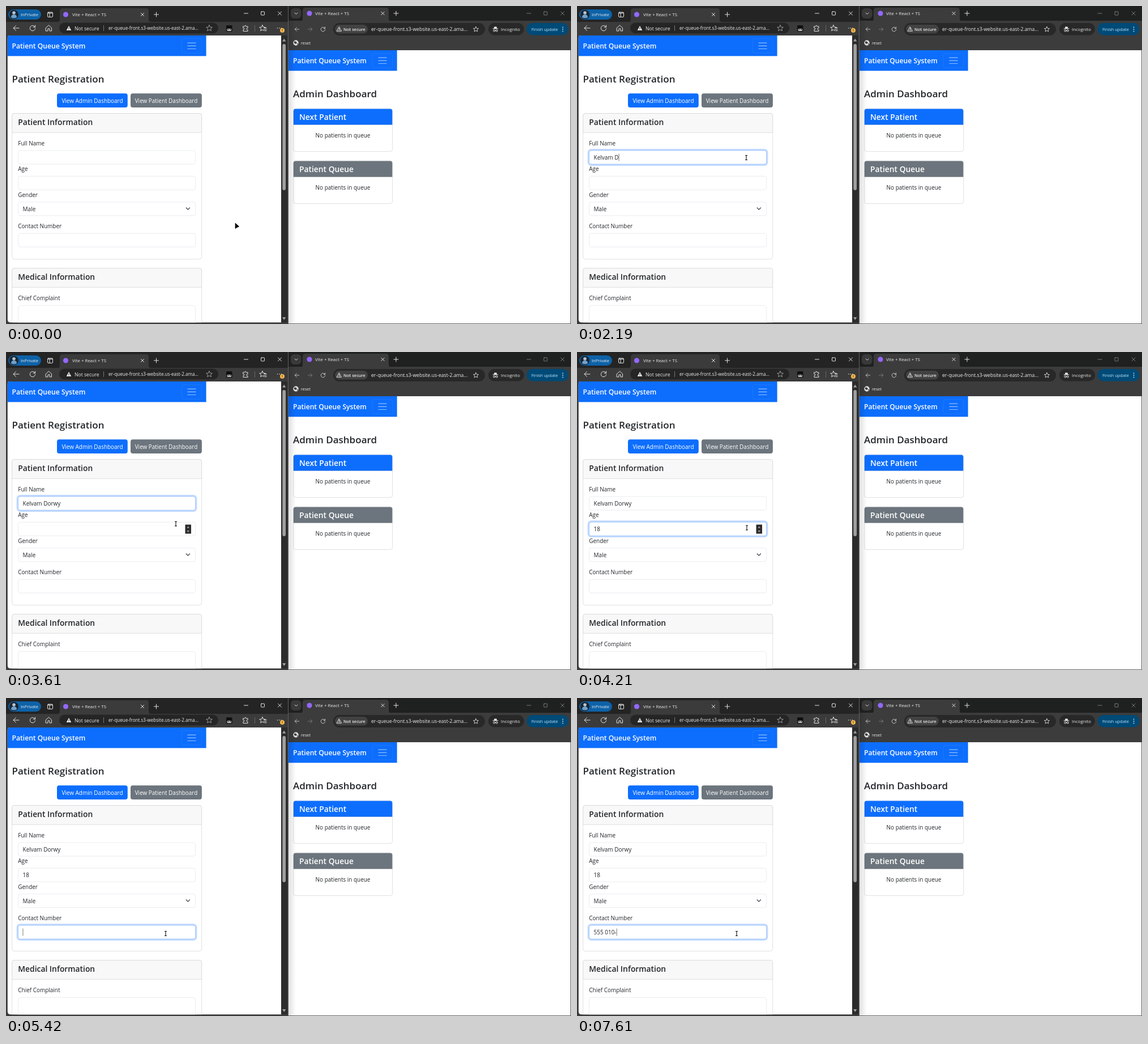
Animation, 998 px wide and 561 px high, one loop 8000 ms. Source, as an HTML page:

```html
<!DOCTYPE html>
<html lang="en">
<head>
<meta charset="utf-8">
<title>Patient queue demo</title>
<style>
html, body { margin: 0; width: 100%; height: 100%; overflow: hidden; background: #fff; }
body { position: relative; font-family: "Open Sans", "Noto Sans", sans-serif; }
svg { position: absolute; left: 0; top: 0; }
text { font-size: 9.95px; fill: #212529; }
.h1 { font-size: 17.05px; font-weight: 600; }
.h2 { font-size: 13.85px; font-weight: 600; }
.brand { font-size: 12.15px; font-weight: 600; }
.white { fill: #fff; }
.mid { text-anchor: middle; }
.ui { fill: #ececec; font-size: 7.9px; }
.line { fill: none; stroke: #e2e2e2; stroke-width: 1; stroke-linecap: round; stroke-linejoin: round; }
.card { fill: #fff; stroke: #d2d3d5; stroke-width: .7; }
.head { fill: #f8f8f8; stroke: #d2d3d5; stroke-width: .7; }
/* Form controls keep their natural CSS sizes and are zoomed like the page. */
.field {
  position: absolute; left: 0; top: 0; width: 484px; height: 38px; box-sizing: border-box;
  transform: translate(21.2px, var(--y)) scale(.648); transform-origin: 0 0;
  border: 1px solid #dee2e6; border-radius: 6px; background: #fff; color: #212529;
  padding-left: 12px; font-size: 15.35px; line-height: 37px; white-space: pre;
}
.field.focus { border-color: #86b7fe; box-shadow: 0 0 0 4px rgba(13, 110, 253, .25); }
.field span { border-right: 1.5px solid transparent; }
.field.caret span { border-color: #333; }
</style>
</head>
<body>
<svg width="998" height="561" viewBox="0 0 998 561">
  <defs>
    <path id="star" class="line" d="M0-5.3 1.6-1.8 5.3-1.5 2.5 1 3.4 4.8 0 2.8-3.4 4.8-2.5 1-5.3-1.5-1.6-1.8Z"/>
    <path id="reload" class="line" d="M4.3-1.8A4.7 4.7 0 1 0 4.7.7M4.6-5V-1.7H1.3"/>
    <path id="back" class="line" d="M5 0H-5M-.6-4.4-5 0-.6 4.4"/>
    <path id="close" class="line" d="M-2.7-2.7 2.7 2.7M2.7-2.7-2.7 2.7"/>
    <path id="plus" class="line" d="M-4 0H4M0-4V4"/>
    <g id="bars" fill="none" stroke="#fff">
      <rect x="-17.8" y="-12.8" width="35.6" height="25.6" rx="4" stroke-opacity=".1" stroke-width=".65"/>
      <path d="M-7.1-5.2H7.1M-7.1 0H7.1M-7.1 5.2H7.1" stroke-opacity=".55" stroke-width="1.2" stroke-linecap="round"/>
    </g>
    <g id="windowButtons" class="line">
      <path d="M-33 0h7"/><rect x="-3" y="-3" width="6" height="6" rx=".8"/>
      <path d="m27-3 6 6m0-6-6 6"/>
    </g>
    <g id="queueCard">
      <rect x=".3" y=".3" width="175.2" height="75.4" rx="4" class="card"/>
      <path d="M.65 28.6V4.4q0-3.800 3.800-3.800h166.900q3.800 0 3.800 3.800v24.200Z"/>
      <path d="M.65 28.200h174.500" stroke="#000" stroke-opacity=".175" stroke-width=".65"/>
    </g>
    <clipPath id="page"><path d="M7 52H486V558.300H8Q2.800 558.300 2.800 553V56Q2.800 52 7 52Z"/></clipPath>
    <linearGradient id="shade">
      <stop stop-color="#000" stop-opacity=".12"/><stop offset="1" stop-color="#000" stop-opacity="0"/>
    </linearGradient>
  </defs>

  <!-- left browser -->
  <rect width="498" height="561" fill="#3b3b3b"/>
  <rect width="498" height="28" fill="#242424"/>
  <path d="M91 28q4 0 4-4V9q0-5 5-5H248q4 0 4 5v15q0 4 4 4Z" fill="#3b3b3b"/>
  <rect x="4" y="6" width="58" height="18" rx="9" fill="#0d62a8"/>
  <circle cx="14" cy="15" r="8" fill="#1c2530"/>
  <circle cx="14" cy="12" r="2.8" fill="#b6c5d4"/>
  <path d="M9 20q0-5 5-5t5 5q-5 3-10 0Z" fill="#6fa1cc"/>
  <text x="26" y="18" class="ui white" style="font-size:7.5px">InPrivate</text>
  <rect x="73.5" y="11" width="9" height="8.5" rx="1.5" class="line"/>
  <path d="M73.5 12.5h9M77 12.5v7" class="line"/>
  <circle cx="105.5" cy="15" r="4.6" fill="#9468fe"/>
  <text x="117" y="18" class="ui">Vite + React + TS</text>
  <use href="#close" x="241" y="15"/>
  <use href="#plus" x="265.5" y="15"/>
  <use href="#windowButtons" x="453.5" y="13"/>
  <use href="#back" x="18" y="39"/>
  <use href="#reload" x="47" y="39"/>
  <path d="M70.5 38.5 75.5 34l5 4.500V44h-3.500v-4h-3v4h-3.500Z" class="line"/>
  <rect x="94" y="29.5" width="281" height="19" rx="9.5" fill="#252525"/>
  <path d="m111 35 4.300 8h-8.600Z" fill="#eee"/>
  <path d="M111 38v2.500m0 1v.8" stroke="#252525"/>
  <text x="121" y="42.500" class="ui" style="font-size:8.65px">Not secure</text>
  <path d="M172.500 34v10" stroke="#777"/>
  <text x="181" y="42.300" class="ui" style="font-size:8.05px">er-queue-front.s3-website.us-east-2.ama...</text>
  <use href="#star" x="359" y="39" opacity=".6"/>
  <rect x="389" y="34" width="10.5" height="11" rx="1.5" fill="#111"/>
  <rect x="390.5" y="40" width="7.5" height="4" rx="1.5" fill="#ddd"/>
  <circle cx="392.6" cy="41.500" r="1.100" fill="#111"/><circle cx="396" cy="41.500" r="1.100" fill="#111"/>
  <path d="M419 36h2.500q.5-2.500 2-1.500l.5 1.500h3v3q-2.500 0-2.500 1.500t2.500 1.500v2.500h-8v-3q2 0 2-1.500t-2-1.500Z" class="line"/>
  <path d="M439.500 34v11" stroke="#666"/>
  <use href="#star" x="453" y="39"/>
  <path d="M455 38h6v6h-5Z" fill="#3b3b3b"/><path d="M456 38.500h4M456 41h4M457 43.500h3" class="line"/>
  <path d="M479.500 39h.1m3.400 0h.1m3.400 0h.1" class="line" style="stroke-width:1.5"/>
  <circle cx="488" cy="43" r="4" fill="#f5b64c"/><path d="M488 41v2.500m0 .8v.8" stroke="#48320c"/>

  <g clip-path="url(#page)">
    <rect x="2" y="52" width="484" height="507" fill="#fff"/>
    <rect x="2" y="52" width="351.6" height="36.300" fill="#0d6efd"/>
    <text x="10.5" y="75" class="brand white">Patient Queue System</text>
    <use href="#bars" x="328" y="70.300"/>
    <text x="10.5" y="135" class="h1">Patient Registration</text>
    <rect x="90" y="154.300" width="124.800" height="24.600" rx="3.900" fill="#0d6efd"/>
    <rect x="220" y="154.300" width="125.900" height="24.600" rx="3.900" fill="#6c757d"/>
    <text x="152.500" y="171" class="mid white">View Admin Dashboard</text>
    <text x="283" y="171" class="mid white">View Patient Dashboard</text>

    <rect x="10.600" y="189.500" width="335" height="257" rx="4" class="card"/>
    <path d="M10.600 223.300v-29.800q0-4 4-4h327q4 0 4 4v29.800Z" class="head"/>
    <text x="21.300" y="210" class="h2">Patient Information</text>
    <text x="21.300" y="246">Full Name</text>
    <text x="21.300" y="291.300">Age</text>
    <text x="21.300" y="336.500">Gender</text>
    <text x="21.300" y="392">Contact Number</text>

    <rect x="10.600" y="462.500" width="335" height="120" rx="4" class="card"/>
    <path d="M10.600 496.300v-29.800q0-4 4-4h327q4 0 4 4v29.800Z" class="head"/>
    <text x="21.300" y="483" class="h2">Medical Information</text>
    <text x="21.300" y="519">Chief Complaint</text>
    <rect x="21.500" y="528.300" width="313" height="50" rx="4" fill="#fff" stroke="#dee2e6" stroke-width=".65"/>
  </g>
  <rect x="486" y="52" width="11" height="506" fill="#2c2c2c"/>
  <path d="m488 62.500 3.200-5 3.200 5ZM488 549l3.200 5 3.200-5Z" fill="#9f9f9f"/>
  <rect x="488.300" y="67" width="5.800" height="258" rx="2.900" fill="#9f9f9f"/>

  <!-- right browser -->
  <rect x="498" width="500" height="561" fill="#606060"/>
  <rect x="499" width="499" height="27" fill="#1f2020"/>
  <rect x="499" y="26" width="499" height="52" fill="#3c3c3c"/>
  <rect x="499" y="78" width="498" height="482" fill="#fff"/>
  <rect x="503" y="4" width="18.500" height="18" rx="6" fill="#393939"/>
  <path d="m510 12 2.500 2.500L515 12" class="line"/>
  <path d="M520 26.500q4 0 4-4V8q0-5 5-5H671q5 0 5 5v14.500q0 4 4 4Z" fill="#3c3c3c"/>
  <circle cx="536" cy="13" r="4.600" fill="#9468fe"/>
  <text x="546" y="16" class="ui">Vite + React + TS</text>
  <use href="#close" x="665.500" y="13"/>
  <use href="#plus" x="689" y="13"/>
  <use href="#windowButtons" x="953" y="13" opacity=".45"/>
  <use href="#back" transform="translate(514 41)scale(.75)"/>
  <use href="#back" transform="translate(537 41)scale(-.75 .75)" opacity=".45"/>
  <use href="#reload" transform="translate(560 41)scale(.8)"/>
  <rect x="578" y="30" width="268" height="22" rx="11" fill="#282828"/>
  <rect x="581" y="33" width="58" height="15.500" rx="7.700" fill="#424242"/>
  <path d="m588.500 37 4 7.300h-8ZM588.500 39.500v2.200m0 .8v.5" class="line"/>
  <text x="596" y="43.700" class="ui" style="font-size:7.45px;font-weight:600">Not secure</text>
  <text x="645" y="44" class="ui" style="font-size:8.65px">er-queue-front.s3-website.us-east-2.ama...</text>
  <use href="#star" transform="translate(830 41)scale(.85)"/>
  <rect x="852" y="30" width="63" height="21.500" rx="10.700" fill="#282828"/>
  <path d="m861.500 40 1-3.500h4l1 3.500Z" fill="#e8e8e8"/>
  <path d="M860 40h9M864 43.500h1" class="line"/>
  <circle cx="862.300" cy="43.500" r="1.600" class="line"/><circle cx="866.700" cy="43.500" r="1.600" class="line"/>
  <text x="874" y="43.700" class="ui" style="font-size:7.8px">Incognito</text>
  <rect x="919.500" y="30" width="74" height="21.500" rx="10.700" fill="#004a77"/>
  <text x="928" y="43.500" class="ui" style="font-size:7.45px;fill:#c2e7ff">Finish update</text>
  <path d="M983.500 37.500v.1m0 3.400v.1m0 3.400v.1" class="line" style="stroke:#c2e7ff;stroke-width:1.8"/>
  <circle cx="512" cy="65" r="4.700" fill="#e3e3e3"/>
  <path d="M509 62.500h3l2 2-2 2.500-3-1.500Zm5 3 2 1-2 2Z" fill="#3c3c3c"/>
  <text x="521" y="67.800" class="ui" style="font-size:7.25px">reset</text>

  <rect x="499" y="78" width="191.700" height="36.300" fill="#0d6efd"/>
  <text x="507" y="101" class="brand white">Patient Queue System</text>
  <use href="#bars" x="665" y="96.300"/>
  <text x="507" y="161" class="h1">Admin Dashboard</text>
  <use href="#queueCard" x="507.200" y="180.900" fill="#0d6efd"/>
  <text x="518" y="201" class="h2 white">Next Patient</text>
  <text x="595" y="232" class="mid">No patients in queue</text>
  <use href="#queueCard" x="507.200" y="272.900" fill="#6c757d"/>
  <text x="518" y="293" class="h2 white">Patient Queue</text>
  <text x="595" y="324" class="mid">No patients in queue</text>
  <rect x="499" y="26" width="13" height="534" fill="url(#shade)"/>
</svg>

<div class="field" id="name" style="--y:254.7px"><span></span></div>
<div class="field" id="age" style="--y:299.9px"><span></span></div>
<div class="field" style="--y:345.5px"><span>Male</span></div>
<div class="field" id="phone" style="--y:400.8px"><span></span></div>

<svg width="998" height="561" viewBox="0 0 998 561">
  <path d="m318.200 356 3.100 3.100 3.100-3.100" fill="none" stroke="#343a40" stroke-width="1.200" stroke-linecap="round" stroke-linejoin="round"/>
  <g id="spinner">
    <rect x="316.500" y="304.500" width="10.500" height="16" fill="#2c2c2c"/>
    <path d="m319.500 310.500 2.200-3 2.200 3ZM319.500 315l2.200 3 2.200-3Z" fill="#aaa"/>
  </g>
  <g id="pointer">
    <circle id="click" r="7.700" fill="#fdf767"/>
    <path id="beam" d="M-2-4h1.300l.7.700.7-.7H2M0-3.500v7M-2 4h1.300L0 3.300l.7.700H2" fill="none" stroke="#111" stroke-width="1.100"/>
    <path id="arrow" d="M0 0V9.800L2.300 8 6.700 6.100Z" fill="#000" stroke="#000" stroke-width=".6" stroke-linejoin="round"/>
  </g>
</svg>

<script>
const LOOP = 8000;
const $ = id => document.getElementById(id);
const fields = ["name", "age", "phone"];
const full = { name: "Kelvam Dorwy", age: "18", phone: "555 010-" };

// Each step lists only what changes at that time.
const steps = [
  { at: 0, x: 405, y: 383, shape: "arrow", focus: "", caret: "", click: false, spinner: false, name: 0, age: 0, phone: 0 },
  { at: 200, x: 362, y: 334 },
  { at: 390, x: 299, y: 267.5, shape: "beam" },
  { at: 580, click: true, caret: "name" },
  { at: 770, click: false, focus: "name" },
  { at: 1170, name: 1 },
  { at: 1380, name: 2 },
  { at: 1580, name: 4 },
  { at: 1780, name: 5 },
  { at: 1990, name: 7 },
  { at: 2190, name: 8 },
  { at: 2390, name: 10 },
  { at: 2590, name: 12, caret: "" },
  { at: 3210, y: 271 },
  { at: 3410, y: 286 },
  { at: 3610, x: 300, y: 303, spinner: true },
  { at: 3830, y: 310, focus: "age", caret: "age" },
  { at: 4210, age: 2, caret: "" },
  { at: 4810, x: 293, y: 346, shape: "arrow", spinner: false },
  { at: 5000, x: 282, y: 415.5, shape: "beam" },
  { at: 5200, click: true, caret: "phone" },
  { at: 5420, click: false, focus: "phone" },
  { at: 5820, phone: 2 },
  { at: 6010, phone: 3 },
  { at: 6410, phone: 4 },
  { at: 6810, phone: 5 },
  { at: 7010, phone: 7 },
  { at: 7610, phone: 8 }
];

const show = (id, on) => { $(id).style.display = on ? "" : "none"; };

function draw(time) {
  const s = Object.assign({}, ...steps.filter(step => step.at <= time));
  for (const id of fields) {
    const field = $(id);
    field.classList.toggle("focus", s.focus === id);
    field.classList.toggle("caret", s.caret === id);
    field.firstChild.textContent = full[id].slice(0, s[id]);
  }
  $("pointer").setAttribute("transform", `translate(${s.x} ${s.y})`);
  show("arrow", s.shape === "arrow");
  show("beam", s.shape === "beam");
  show("click", s.click);
  show("spinner", s.spinner);
}

const start = performance.now();
function tick() {
  draw((performance.now() - start) % LOOP);
  requestAnimationFrame(tick);
}
tick();
</script>
</body>
</html>
```
